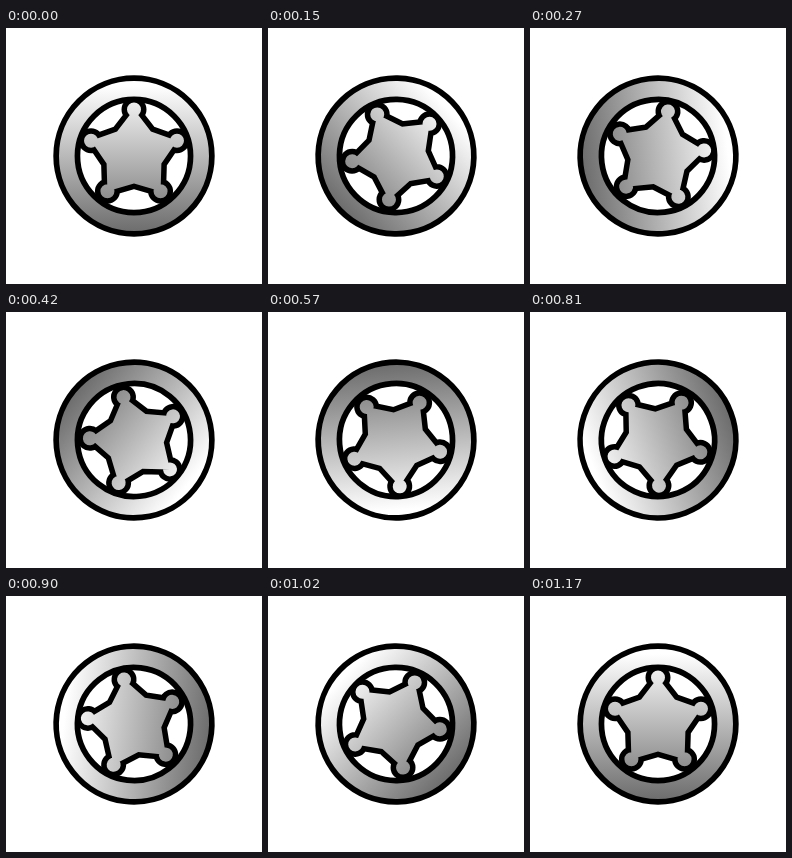
Write an HTML page with a canvas that moves like this. It is 256 px wide and 256 px high and loops after 1.2 s.

```html
<!DOCTYPE html>
<html>
<head>
<meta charset="utf-8">
<style>
  html, body { margin: 0; height: 100%; overflow: hidden; background: #fff; }
  canvas { display: block; }
</style>
</head>
<body>
<canvas width="256" height="256"></canvas>
<script>
const ctx = document.querySelector('canvas').getContext('2d');
const LOOP = 1200, STEP = 30, LAST = LOOP / STEP - 1;
const TAU = Math.PI * 2;
const TIP = 45.2, NOTCH = 28.8, KNOB = 7, STAR_Y = -1.3;

const polar = (radius, turn) =>
  [radius * Math.sin(turn * TAU), STAR_Y - radius * Math.cos(turn * TAU)];

const star = new Path2D();
for (let i = 0; i < 5; i++) {
  star.lineTo(...polar(TIP, i / 5));
  star.lineTo(...polar(NOTCH, (i + 0.5) / 5));
}
star.closePath();
for (let i = 0; i < 5; i++) {
  const [x, y] = polar(TIP, i / 5);
  star.moveTo(x + KNOB, y);
  star.arc(x, y, KNOB, 0, TAU);
}

const ring = new Path2D();
ring.arc(0, 0, 67.2, 0, TAU);

const metal = ctx.createLinearGradient(0, -70, 0, 77);
metal.addColorStop(0, '#fff');
metal.addColorStop(1, '#6c6c6c');

function strokePath(path, width, color) {
  ctx.lineWidth = width;
  ctx.strokeStyle = color;
  ctx.stroke(path);
}

function draw() {
  const step = Math.floor(performance.now() % LOOP / STEP);
  ctx.setTransform(1, 0, 0, 1, 0, 0);
  ctx.clearRect(0, 0, 256, 256);
  ctx.translate(128, 128);
  ctx.rotate(step / LAST * TAU);
  ctx.lineJoin = 'round';

  strokePath(ring, 27, '#000');
  strokePath(star, 11, '#000');
  strokePath(ring, 15.6, metal);
  ctx.fillStyle = metal;
  ctx.fill(star);
  requestAnimationFrame(draw);
}
draw();
</script>
</body>
</html>
```
